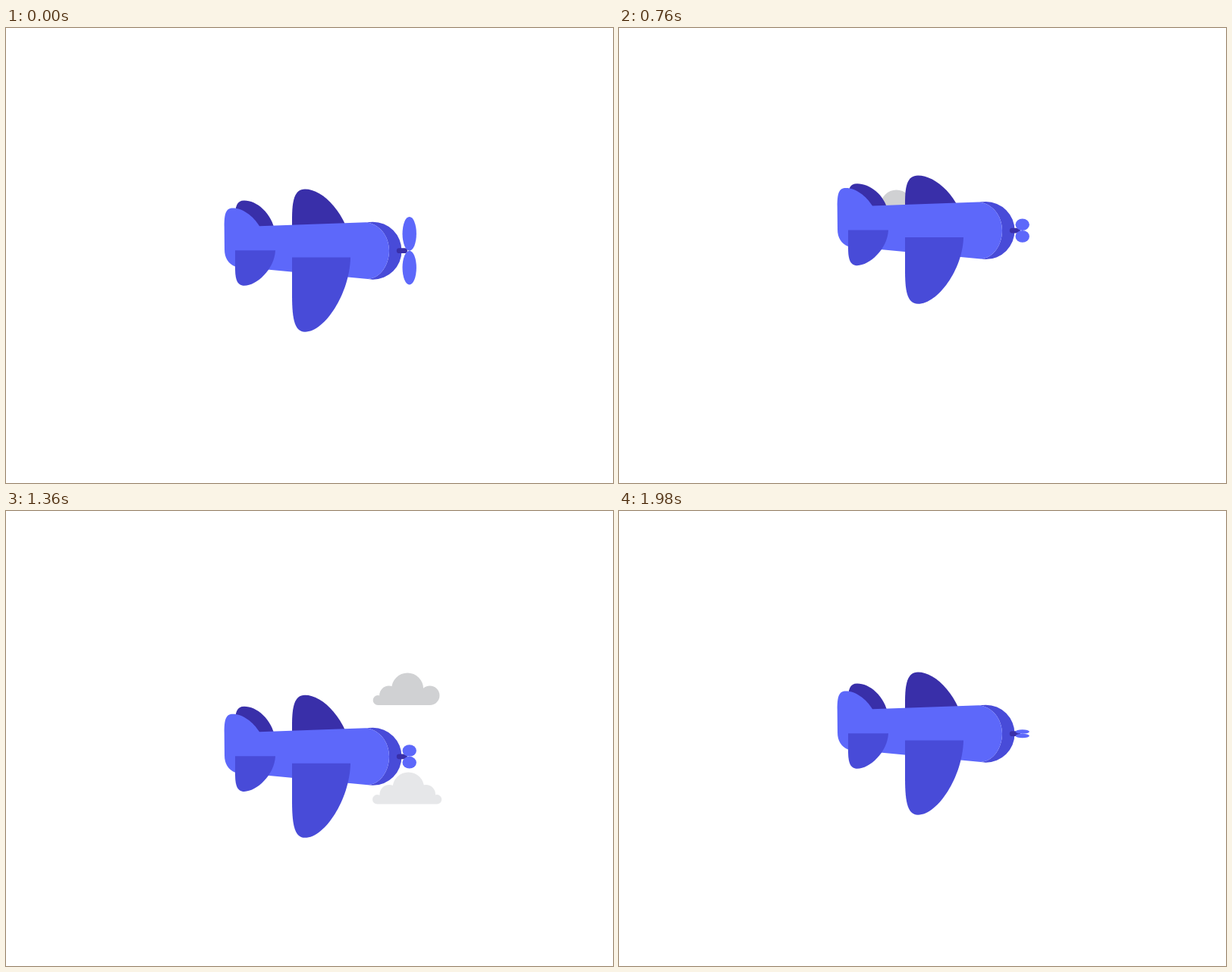
Recreate the animation shown at these times as an HTML page with a canvas. Size 800 by 600 pixels, loop 2 s.

```html
<!DOCTYPE html>
<html lang="en">
<head>
<meta charset="utf-8">
<title>Little plane</title>
<style>
  html, body { margin: 0; width: 100%; height: 100%; overflow: hidden; background: #fff; }
  canvas { display: block; width: 800px; height: 600px; }
</style>
</head>
<body>
<canvas id="stage" width="800" height="600"></canvas>
<script>
const ctx = document.getElementById('stage').getContext('2d');

const LOOP = 2000, STEP = 20;
const LIGHT = '#5d68fa', MID = '#484bd8', DARK = '#392fa9';

const shapes = {
  farTail: new Path2D('M302 270V250C302 235 304 227.5 314 227.5C330 227.5 350 243 355 270Z'),
  farWing: new Path2D('M377 293.5V252C377 228 380 212.5 394 212.5C418 212.5 449 244 458 293.5Z'),
  body: new Path2D('M288 292L287.7 262C287.7 244 290 237.5 299 237.5C312 237.5 326 248 334 261.2' +
    'L474 256.2C492 258 505 274 505 293.5C505 312 494 330 477 331L302 314.5C293 311 288 303 288 292Z'),
  nose: new Path2D('M474 256.2L483.5 255.7A38 38 0 0 1 483.5 331.7L477 331' +
    'C494 330 505 312 505 293.5C505 274 492 258 474 256.2Z'),
  tail: new Path2D('M302 293.2H355C354 318 330 339.8 314 339.8C304 339.8 302 330 302 316Z'),
  wing: new Path2D('M377 302.5H454C453 350 420 400.7 394 400.7C379 400.7 377 380 377 350Z')
};

// Circles as [x, y, r], measured from the cloud's left end and base line
const highCloud = { color: '#d0d1d3', foot: [6.5, 75], parts: [[6.5, -6.5, 6.5], [21, -13, 12.5], [45.5, -21.5, 21], [75, -12.8, 12.8]] };
const lowCloud = { color: '#e2e3e5', foot: [6.2, 85], parts: [[6.2, -6.2, 6.2], [22, -13, 12.5], [47.3, -21.2, 20.8], [70.5, -13, 12.5], [85, -6.2, 6.2]] };

const clamp = v => Math.min(1, Math.max(0, v));
const smooth = v => v * v * (3 - 2 * v);

function bezier(x1, y1, x2, y2) {
  const at = (a, b, s) => 3 * a * s * (1 - s) ** 2 + 3 * b * s * s * (1 - s) + s ** 3;
  return p => {
    let lo = 0, hi = 1;
    for (let i = 0; i < 24; i++) {
      const s = (lo + hi) / 2;
      if (at(x1, x2, s) < p) lo = s; else hi = s;
    }
    return at(y1, y2, (lo + hi) / 2);
  };
}
const arrive = bezier(0.167, 0.167, 0.667, 1);
const leave = bezier(0.333, 0, 0.833, 0.833);
const settle = bezier(0.355, 0, 0.8, 0.8);

// Vertical bob of the plane; n counts steps of 20 ms
function bob(n) {
  if (n < 25) return -43.4 * arrive(n / 25);
  if (n < 50) return -43.4 * (1 - leave((n - 25) / 25));
  if (n < 75) return 35 * arrive((n - 50) / 25);
  return 35 * (1 - settle(clamp((n - 75) / 24)));
}

function drawCloud(cloud, x, base, alpha) {
  if (alpha <= 0) return;
  const path = new Path2D();
  for (const [cx, cy, r] of cloud.parts) {
    path.moveTo(x + cx + r, base + cy);
    path.arc(x + cx, base + cy, r, 0, 2 * Math.PI);
  }
  const [a, b] = cloud.foot;
  path.rect(x + a, base - 12, b - a, 12);
  ctx.globalAlpha = alpha;
  ctx.fillStyle = cloud.color;
  ctx.fill(path);
  ctx.globalAlpha = 1;
}

// The low cloud sweeps left, slowing a little; d is steps past its entry
function sweep(d, x, speed) {
  const alpha = Math.min(clamp((d + 3.4) / 4), clamp((21.2 - d) / 5.4));
  drawCloud(lowCloud, x - speed * d + 0.079 * d * d, 386.5, alpha);
}

function fill(path, color, pivot = 0, scale = 1) {
  ctx.save();
  ctx.translate(0, pivot);
  ctx.scale(1, scale);
  ctx.translate(0, -pivot);
  ctx.fillStyle = color;
  ctx.fill(path);
  ctx.restore();
}

function drawPropeller(n) {
  const y = 293.7, phase = n % 6;
  const swing = smooth(phase < 3 ? phase / 3 : 2 - phase / 3);
  const ry = (44.8 - 39.3 * swing) / 2;

  ctx.fillStyle = DARK;
  ctx.beginPath();
  ctx.roundRect(514.8, y - 3.4, 14.2, 6.8, 3.4);
  ctx.fill();

  ctx.fillStyle = LIGHT;
  for (const side of [-1, 1]) {
    ctx.beginPath();
    ctx.ellipse(531.7, y + side * ry, 9.2, ry, 0, 0, 2 * Math.PI);
    ctx.fill();
  }
}

function drawPlane(n) {
  const bank = 1 - 0.22 * clamp(1 - Math.abs(n - 25) / 25);
  ctx.save();
  ctx.translate(0, bob(n));
  fill(shapes.farTail, DARK, 269.5, bank);
  fill(shapes.farWing, DARK, 293.5, bank);
  fill(shapes.nose, MID);
  fill(shapes.body, LIGHT);
  fill(shapes.tail, MID);
  fill(shapes.wing, MID, 302.5, bank);
  drawPropeller(n);
  ctx.restore();
}

function draw(ms) {
  const n = Math.floor((ms % LOOP) / STEP + 0.001);
  ctx.fillStyle = '#fff';
  ctx.fillRect(0, 0, 800, 600);

  const alpha = Math.min(clamp((n - 10) / 6), clamp((81 - n) / 7));
  drawCloud(highCloud, 198.5 + 376 * smooth(n / 100), 256, alpha);
  if (n < 40) sweep(n - 3.8, 478.1, 16.65);
  else sweep(n - 68, 483, 16.95);

  drawPlane(n);
}

const start = performance.now();
function tick() {
  draw(performance.now() - start);
  requestAnimationFrame(tick);
}
tick();
</script>
</body>
</html>
```
